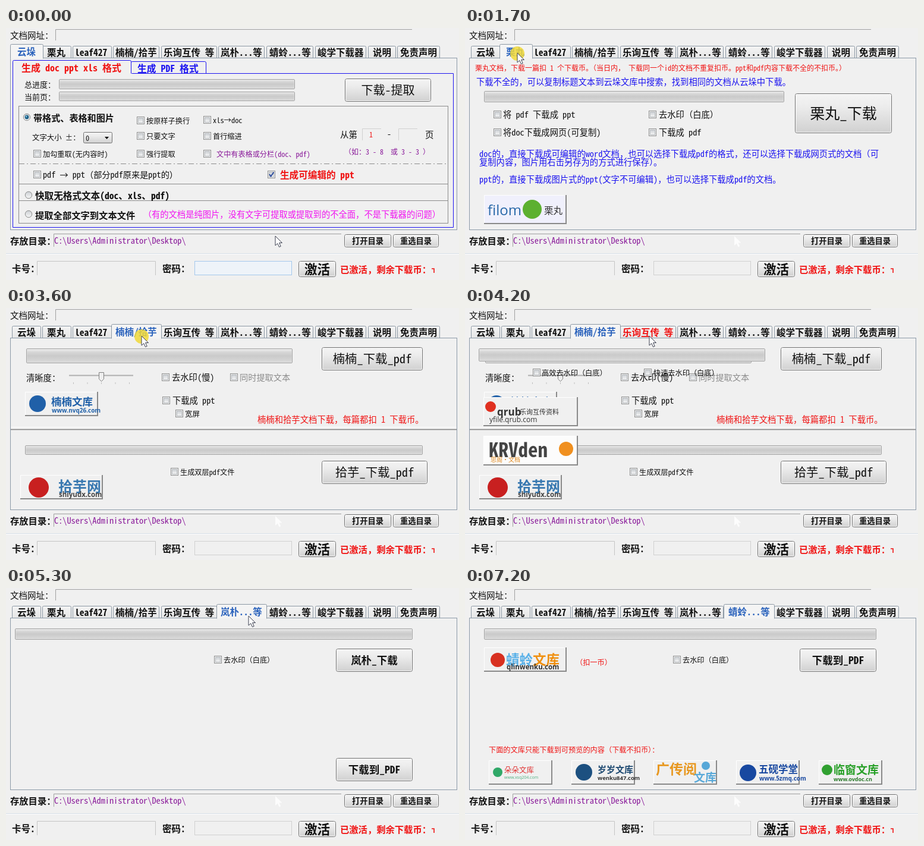
An HTML page for the animation above (7.7 s loop, 762x424 px).

```html
<!DOCTYPE html>
<html lang="zh-CN">
<head>
<meta charset="utf-8">
<title>文档下载器</title>
<style>
html, body { margin: 0; width: 100%; height: 100%; overflow: hidden; background: #f0f0f0; }
svg { display: block; width: 762px; height: 424px; }
text { font-family: "Noto Sans Mono CJK SC", "Noto Sans CJK SC", "Noto Sans CJK", monospace; white-space: pre; }
.b { font-weight: 700; }
.m { text-anchor: middle; }
.u { font-family: "Open Sans", "DejaVu Sans", sans-serif; }
</style>
</head>
<body>
<svg id="stage" viewBox="0 0 762 424"></svg>
<script>
const RED = '#f01414', BLUE = '#1c14f0', PURPLE = '#8a1a9a', MAGENTA = '#f014f0', GREY = '#8b8b8b';

// Text is placed by its left (or middle) x and the centre of its line.
const text = (x, cy, size, str, fill = '#111', cls = '') =>
  `<text x="${x}" y="${(cy + size * 0.38).toFixed(1)}" font-size="${size}" fill="${fill}" class="${cls}">${str}</text>`;
const rect = (x, y, x2, y2, attrs) =>
  `<rect x="${x}" y="${y}" width="${x2 - x}" height="${y2 - y}" ${attrs}/>`;
const path = (d, stroke, attrs = '') => `<path d="${d}" fill="none" stroke="${stroke}" ${attrs}/>`;
const circle = (x, y, r, fill) => `<circle cx="${x}" cy="${y}" r="${r}" fill="${fill}"/>`;

const button = (x, y, x2, y2, size, str, cls = '') =>
  rect(x + .5, y + .5, x2 - .5, y2 - .5, 'rx="3" fill="url(#btn)" stroke="#707070"') +
  rect(x + 1.5, y + 1.5, x2 - 1.5, y2 - 1.5, 'rx="2" fill="none" stroke="#fafafa"') +
  text((x + x2) / 2, (y + y2) / 2, size, str, '#111', 'm ' + cls);

const bar = (x, y, x2, y2) =>
  rect(x + .5, y + .5, x2 - .5, y2 - .5, 'rx="1.5" fill="url(#bar)" stroke="#a4a4a4"') +
  rect(x + 1.5, y + 1.5, x2 - 1.5, y2 - 1.5, 'fill="none" stroke="#e2e2e2" stroke-opacity=".6"');

const check = (x, y, size, str, fill, dx = 16) =>
  rect(x + .5, y + .5, x + 12.5, y + 12.5, 'fill="#f4f4f4" stroke="#8e8f8f"') +
  rect(x + 2.5, y + 2.5, x + 10.5, y + 10.5, 'fill="url(#box)" stroke="#b4b8bc"') +
  text(x + dx, y + 7, size, str, fill);

const radio = (x, y, on) =>
  `<circle cx="${x}" cy="${y}" r="5.7" fill="url(#box)" stroke="#8e8f8f"/>` +
  (on ? circle(x, y, 3.4, '#1d5f86') + circle(x - .8, y - 1, 1.2, '#8fd0ee') : '');

const raised = (x, y, x2, y2, fill = '#f0f0f0') =>
  rect(x, y, x2, y2, `fill="${fill}"`) +
  path(`M${x + .5} ${y2}V${y + .5}H${x2}`, '#fff') +
  path(`M${x} ${y2 - 1}H${x2 - 1}V${y}`, '#8a8a8a', 'stroke-width="2"');

const group = (inner, attrs) => `<g ${attrs}>${inner}</g>`;

function formPage() {
  return path('M211.500 76.500H752.500V335.500H11.500V56.500Q11.500 54.500 13.500 54.500H208.500Q210.500 54.500 210.500 57V76.500M211 57.500Q211 56.500 213 56.500H334.500Q336.500 56.500 336.500 59V76', BLUE) +
    text(26, 67, 16, '生成 doc ppt xls 格式', RED, 'b') +
    text(221, 68, 15.8, '生成 PDF 格式', BLUE, 'b') +
    text(31, 95, 13, '总进度：') + text(31, 116, 13, '当前页：') +
    bar(89, 86, 486, 103) + bar(89, 107, 486, 123) +
    button(570, 85, 715, 124, 20, '下载-提取') +
    rect(21.5, 131.5, 743.5, 328.500, `fill="none" stroke="${GREY}"`) +
    path('M22 262.500H743M22 290.500H743', GREY) +
    path('M22 228.500H743', GREY, 'stroke-dasharray="9 4 2 4"') +
    radio(35, 150, true) + text(46, 151, 15.1, '带格式、表格和图片', '#111', 'b') +
    text(44, 184, 12.4, '文字大小 ±：') +
    rect(130.5, 175.5, 178.500, 193.500, 'rx="2" fill="url(#btn)" stroke="#707070"') +
    text(134, 185, 12.4, '0') + '<path d="M166 183h7l-3.500 4z"/>' +
    check(46, 205, 12.2, '加勾重取(无内容时)') +
    check(220, 149, 12.2, '按原样子换行') + check(220, 175, 12.2, '只要文字') + check(220, 205, 12.2, '强行提取') +
    check(332, 148, 12.4, 'xls→doc') + check(332, 175, 12.2, '首行缩进') +
    check(332, 205, 12.15, '文中有表格或分栏(doc、pdf)', PURPLE, 22) +
    text(562, 179, 14.5, '从第') + text(705, 179, 14.5, '页') +
    path('M599.500 189V169.500H631M660.500 189V169.500H692', '#d0d0d0') +
    text(611, 179, 12, '1', RED) + text(641, 178, 14, '-') +
    text(569, 208, 12, '（如：3 - 8  或 3 - 3 ）', PURPLE) +
    check(46, 240, 14.2, 'pdf → ppt（部分pdf原来是ppt的）') +
    check(440, 240, 15.6, '') + path('M443 246l2.500 3.500 5-7', '#2a4a9a', 'stroke-width="2"') +
    text(461, 247, 15.6, '生成可编辑的 ppt', RED, 'b') +
    radio(38, 281) + text(49, 282, 15.6, '快取无格式文本(doc、xls、pdf)', '#111', 'b') +
    radio(38, 313) + text(49, 315, 15.3, '提取全部文字到文本文件', '#111', 'b') +
    text(230.7, 314, 14.3, '（有的文档是纯图片，没有文字可提取或提取到的不全面，不是下载器的问题）', MAGENTA);
}

function secondPage() {
  return text(17, 67, 12, '栗丸文档，下载一篇扣 1 个下载币。（当日内， 下载同一个id的文档不重复扣币。ppt和pdf内容下载不全的不扣币。）', RED) +
    text(19, 91, 14.3, '下载不全的，可以复制标题文本到云垛文库中搜索，找到相同的文档从云垛中下载。', BLUE) +
    bar(32, 106, 537, 125) + button(555, 110, 718, 177, 25, '栗丸_下载') +
    check(48, 139, 14.3, '将 pdf 下载成 ppt') + check(309, 139, 14.3, '去水印（白底）', '#111', 17) +
    check(48, 169, 14.3, '将doc下载成网页(可复制)') + check(309, 169, 14.3, '下载成 pdf', '#111', 17) +
    text(24, 212, 14.3, 'doc的，直接下载成可编辑的word文档，也可以选择下载成pdf的格式，还可以选择下载成网页式的文档（可', BLUE) +
    text(24, 226, 14.3, '复制内容，图片用右击另存为的方式进行保存）。', BLUE) +
    text(24, 255, 14.3, 'ppt的，直接下载成图片式的ppt(文字不可编辑)，也可以选择下载成pdf的文档。', BLUE) +
    raised(32, 281, 171, 330, '#f0f0fc') + circle(113, 305, 16, '#5cb030') +
    text(38, 306, 24, 'filom', '#2868a8', 'u') + text(133, 307, 15.5, '栗丸', '#333');
}

function stamp(x, y, angle, str) {
  return group(rect(-64, -18, 64, 18, 'fill="none" stroke="#e0402c" stroke-width="1.300"') +
    text(0, 0, 25, str, '#e0402c', 'm" letter-spacing="5'), `transform="translate(${x} ${y}) rotate(${angle})"`);
}

function sampleSheet() {
  const inner = rect(28, 196, 563, 333, 'fill="#fff"') +
    text(100, 196, 12.3, '本文档一共被下载：  密 次,您可全文免费在线阅读后下载本文档。', '#555') +
    path('M28 209.500H163', '#c4dcec') + path('M65 196H95', '#8cb0dc', 'stroke-width="3"') +
    stamp(97, 237, -32, '全文可看') +
    path('M397 243H424M397 248H420M400 254H424', '#78a0d8', 'stroke-width="2"') +
    text(431, 252, 18, '料.doc', '#111', 'b') + text(493, 252, 16, '4页', '#2020c0') +
    text(384, 271, 12.5, '本文档一共被下载：', '#555') + text(498, 267, 13, '密', '#208020', 'b') +
    text(513, 271, 12.5, '次', RED) + text(526, 271, 12.5, ',您可全', '#555') +
    rect(384, 283, 563, 333, 'fill="#808080"') + stamp(431, 292, -34, '试读文档') +
    '<ellipse cx="462" cy="297" rx="95" ry="46" fill="none" stroke="#ee3a2c" stroke-width="2.500"/>' +
    path('M163 232L106 246M361 296H378', '#ee3a2c', 'stroke-width="3"') +
    '<path d="M91 250l15-10 2 12zM393 297l-15-6v12z" fill="#ee3a2c"/>' +
    rect(163.5, 213.5, 558.5, 241.5, 'fill="#fff" stroke="#3a9a9c" stroke-width="3"') +
    text(168, 229, 16.2, '像这种有“全文可看”标志的，才可以下载全部内容。', '#1a1ae0', 'b') +
    rect(80.5, 283.5, 359.500, 310.500, 'fill="#fff" stroke="#3a8a30" stroke-width="3"') +
    text(84, 298, 16, '如果是“试读文档”的就下载不全了。', '#143c50', 'b');
  return rect(24, 192, 568, 337, 'fill="#e4e4e4" stroke="#8a8a8a" stroke-width="2"') + group(inner, 'clip-path="url(#sheet)"');
}

function thirdPage() {
  return text(32, 69, 14.3, 'leaf427文档，每篇下载扣 1 个下载币，同一id的文档，当日不重复扣。', RED) +
    bar(32, 81, 570, 105) + button(645, 68, 733, 107, 20.5, '下载') +
    text(39, 119, 14.3, '目前主要支持 doc docx pdf rtf ppt 文档的下载。', BLUE) +
    text(39, 148, 14.3, 'rtf 文档下载成为可编辑的 word 文件。其它下载为 pdf 文件。', BLUE) +
    text(39, 176, 14.3, 'ppt 文档下载有两种供选择：不可编辑和可编辑。', BLUE) +
    radio(637, 146) + text(647, 146, 12.3, 'ppt不可编辑') +
    radio(637, 171, true) + text(647, 171, 12.3, 'ppt可编辑') +
    check(645, 188, 12.2, '多行文本整合', '#111', 15) + sampleSheet() +
    raised(595, 280, 751, 330, '#f6f4ee') + rect(596, 325, 749, 328, 'fill="#e85030"') +
    text(606, 304, 21, '文档投稿赚钱', '#e83418', 'b') + text(602, 319, 12, 'http://max.leaf427.com', '#6a5a28', 'u b');
}

function fourthPage() {
  const slider = path('M106 113.500H214', '#b0b0b0', 'stroke-width="2"') +
    path('M113.500 125v3m23.500-3v3m23.500-3v3m23.500-3v3m23.500-3v3', '#c0c0c0') +
    '<path d="M156.500 108.500h8v11l-4 4-4-4z" fill="#eee" stroke="#808080"/>';
  return bar(34, 68, 482, 93) + button(531, 66, 701, 105, 20.4, '楠楠_下载_pdf') +
    text(34, 118, 14.3, '清晰度：') + slider +
    check(262, 110, 14.3, '去水印(慢)', '#111', 17) + check(377, 110, 14.2, '同时提取文本', GREY) +
    raised(32, 141, 155, 182) + circle(53, 161, 14, '#2060a8') +
    text(76, 157, 17.5, '楠楠文库', '#2060a8', 'b') + text(77, 172, 10, 'www.nvq26.com', '#2060a8', 'u b') +
    check(263, 149, 14.3, '下载成 ppt', '#111', 17) + check(285, 171, 12.5, '宽屏') +
    text(423, 187, 14.35, '楠楠和拾芋文档下载，每篇都扣 1 下载币。', RED) +
    path('M8 200.500H758', '#fff') + path('M8 204.500H758', '#808080', 'stroke-width="1.500"') +
    bar(32, 231, 701, 247) + check(277, 269, 12.2, '生成双层pdf文件') +
    button(531, 257, 709, 296, 20.4, '拾芋_下载_pdf') +
    raised(24, 281, 163, 322) + circle(55, 302, 17, '#c82020') +
    text(88, 300, 24, '拾芋网', '#3878b0', 'b') + text(89, 314, 11.5, 'shiyudx.com', '#444', 'u b');
}

function fifthControls() {
  return bar(23, 68, 505, 90) +
    check(114, 102, 12.2, '高效去水印（白底）', '#111', 15) + check(301, 102, 12.2, '快速去水印（白底）') +
    raised(31, 150, 190, 199) + circle(43, 166, 9, '#e03020') + text(54, 174, 17, 'qrub', '#333', 'u b') +
    text(92, 175, 11, '乐询互传资料', '#333') + text(41, 187, 12, 'yfile.qrub.com', '#333', 'u') +
    raised(31, 215, 190, 265, '#fcfcfc') + circle(170, 237, 12, '#f09020') +
    text(40, 238, 33, 'KRVden', '#444', 'b') + text(43, 255, 10, '思阁·文档', '#e08a20');
}

const fifthButtons = () => button(463, 151, 667, 195, 17.4, '乐询互传资料 下载', 'b') +
  button(463, 216, 667, 260, 17.6, 'KRVden 下载', 'b');

const sixthPage = () => bar(15, 68, 684, 87) + check(350, 114, 12.2, '去水印（白底）') +
  button(555, 102, 684, 141, 17.5, '岚朴_下载', 'b') + button(555, 286, 684, 325, 17.5, '下载到_PDF', 'b');

function seventhPage() {
  const tiles = [40, 179, 317, 456, 595].map(x => raised(x, 290, x + 107, 331)).join('');
  return bar(32, 68, 692, 87) +
    raised(32, 100, 171, 141) + circle(55, 121, 12, '#d83020') +
    text(69, 120, 22.500, '蜻蛉<tspan fill="#f09010">文库</tspan>', '#58b0e8', 'b') +
    text(70, 133, 11.5, 'qlinwenku.com', '#333', 'u b') +
    text(186, 125, 12.2, '（扣一币）', RED) + check(350, 114, 12.2, '去水印（白底）') +
    button(563, 102, 692, 141, 17.5, '下载到_PDF', 'b') +
    text(40, 272, 12.2, '下面的文库只能下载到可预览的内容（下载不扣币）：', RED) + tiles +
    circle(55, 310, 8, '#30a868') + text(66, 306, 12.500, '朵朵文库', '#e03030') + text(66, 318, 7, 'www.xsq204.com', '#50b080', 'u') +
    circle(200, 310, 14, '#1c5080') + text(223, 305, 15, '岁岁文库', '#1c4870', 'b') + text(223, 319, 9.500, 'wenku847.com', '#333', 'u b') +
    circle(405, 299, 7, '#58a8d8') + text(321, 304, 23, '广传阅', '#e89820', 'b') + text(385, 319, 19, '文库', '#58a8d8', 'b') +
    circle(476, 311, 14, '#1848a0') + text(494, 305, 16.5, '五砚学堂', '#1848a0', 'b') + text(495, 320, 10, 'www.5zmq.com', '#1848a0', 'u b') +
    circle(609, 306, 9, '#30a030') + text(620, 306, 19, '临窗文库', '#28a028', 'b') + text(620, 322, 9, 'www.ovdoc.cn', '#287828', 'u b');
}

const tabs = [
  [10, 59, 19, '云垛'], [61, 110, 69, '栗丸'], [112, 178, 116, 'leaf427'], [180, 258, 184, '楠楠/拾芋'],
  [261, 355, 265, '乐询互传 等'], [357, 435, 361, '岚朴...等'], [438, 517, 443, '蜻蛉...等'],
  [520, 606, 524, '峻学下载器'], [609, 656, 617, '说明'], [658, 730, 663, '免责声明']
];

function drawTabs(selected, hover) {
  const shape = (l, r, top, bottom, fill) =>
    path(`M${l + .5} ${bottom}V${top + 2.5}q0-2 2-2H${r - 2.5}q2 0 2 2V${bottom}`, '#8c98a4', `style="fill:${fill}"`);
  const tab = ([l, r, x, name], i) => i === selected
    ? shape(l - 3, r + 4, 27, 51.5, '#f4f4f4') + text(x, 40, 15.5, name, '#2a62bc', 'b')
    : shape(l, r, 30, 50, 'url(#tab)') + text(x, 41, 15.5, name, i === hover ? RED : '#111', 'b');
  return tabs.map((t, i) => i === selected ? '' : tab(t, i)).join('') + tab(tabs[selected], selected);
}

function frameParts() {
  return text(7, 12, 14.5, '文档网址：') + path('M83.500 21V2.500H683', '#a0a0a0') +
    rect(7.5, 50.5, 758.5, 339.5, 'fill="none" stroke="#8c9aa8"') +
    text(7, 358, 15.3, '存放目录：', '#111', 'b') + path('M80.500 368V346.500H564', '#a0a0a0') +
    text(81, 358, 14.3, 'C:\\Users\\Administrator\\Desktop\\', PURPLE) +
    button(569, 347, 648, 369, 13.3, '打开目录', 'b') + button(651, 347, 728, 369, 13.3, '重选目录', 'b') +
    path('M0 379.500H762', '#d4dce4') + path('M0 380.500H762', '#fff') +
    text(10, 405, 15.5, '卡号：', '#111', 'b') + text(263, 405, 15.5, '密码：', '#111', 'b') +
    path('M52.500 416V392.500H251.500V416', '#c4c4c4') +
    rect(317.5, 392.500, 480.500, 415.500, 'fill="#f0f0f0" stroke="#d0d0d0"') +
    rect(317.5, 392.500, 480.500, 415.500, 'id="focus" fill="#eef3f9" stroke="#a4c8ec"') +
    button(492, 392, 555, 419, 21.5, '激活', 'b') +
    text(562, 406, 15.3, '已激活，剩余下载币：', RED, 'b') + path('M716 405H720V412', RED, 'stroke-width="1.600"');
}

const gradient = (id, ...colors) => `<linearGradient id="${id}" x2="0" y2="1">` +
  colors.map((c, i) => `<stop offset="${i / (colors.length - 1)}" stop-color="${c}"/>`).join('') + '</linearGradient>';
const defs = '<defs>' + gradient('btn', '#f4f4f4', '#ececec', '#dedede', '#d0d0d0') +
  gradient('bar', '#f0f0f0', '#d6d6d6', '#cacaca', '#d2d2d2', '#dcdcdc') +
  gradient('box', '#ccd0d4', '#f6f6f6') + gradient('tab', '#f4f4f4', '#e6e6e6') +
  '<clipPath id="sheet"><path d="M28 196H563V333H28z"/></clipPath></defs>';
const arrow = 'M0 0V16L3.800 12.500L6.500 18.500L9.200 17.300L6.600 11.500H11.500Z';

const pages = [formPage, secondPage, thirdPage, fourthPage, fifthControls, sixthPage, seventhPage, fifthButtons];
const stage = document.getElementById('stage');
stage.innerHTML = defs + frameParts() +
  pages.map(p => group(p(), 'class="page"')).join('') + '<g id="tabs"></g>' +
  `<path d="${arrow}" transform="translate(453 350)" fill="#fcfcfc"/>` +
  `<g id="cursor"><circle id="click" cy="1" r="12" fill="#f0d838" fill-opacity=".85"/><path d="${arrow}" fill="#fff" stroke="#3c4050"/></g>`;

// time, visible pages (first one is the selected tab), cursor x, y, hovered tab, click ring
const steps = [
  [0, '0', 453, 350], [200, '0', 340, 220], [300, '0', 223, 78],
  [500, '0', 160, 43, 2], [600, '0', 140, 43, 2], [800, '0', 100, 43, 1], [900, '0', 88, 42, 1],
  [1700, '1', 88, 42, 1, 1], [1900, '1', 88, 42, 1], [2200, '1', 125, 45, 2], [2300, '1', 152, 45, 2],
  [2800, '2', 152, 45, 2, 1], [3000, '2', 185, 47, 3], [3100, '2', 213, 47, 3], [3300, '2', 228, 47, 3],
  [3600, '3', 228, 47, 3, 1], [3800, '3', 270, 48, 4], [3900, '3', 310, 47, 4],
  [4100, '3', 310, 47, 4, 1], [4200, '34', 310, 47, 4], [4400, '47', 360, 47, 5], [4500, '47', 396, 47, 5],
  [4700, '47', 398, 47, 5], [4800, '47', 401, 48, 5], [5200, '5', 408, 47, 5, 1], [5300, '5', 408, 47, 5],
  [5500, '5', 440, 46, 6], [5600, '5', 464, 45, 6], [5800, '6', 464, 45, 6, 1], [5900, '6', 464, 45, 6],
  [6900, '6', 560, 48, 7], [7100, '6', 719, 321], [7200, '6']
];
const LOOP = 7700;
const [focus, tabBar, cursor, click] = ['focus', 'tabs', 'cursor', 'click'].map(id => document.getElementById(id));
const pageNodes = [...document.querySelectorAll('.page')];
const show = (node, on) => { node.style.display = on ? '' : 'none'; };
const start = performance.now();
let current = -1;

function tick() {
  const t = (performance.now() - start) % LOOP;
  const i = steps.findLastIndex(s => s[0] <= t);
  if (i !== current) {
    current = i;
    const [, visible, x, y, hover, ring] = steps[i];
    pageNodes.forEach((node, n) => show(node, visible.includes(n)));
    tabBar.innerHTML = drawTabs(+visible[0], hover);
    show(cursor, x !== undefined);
    if (x !== undefined) cursor.setAttribute('transform', `translate(${x} ${y})`);
    show(click, ring);
    focus.style.opacity = [1, .6, .3, .15][i] || 0;
  }
  requestAnimationFrame(tick);
}
tick();
</script>
</body>
</html>
```
